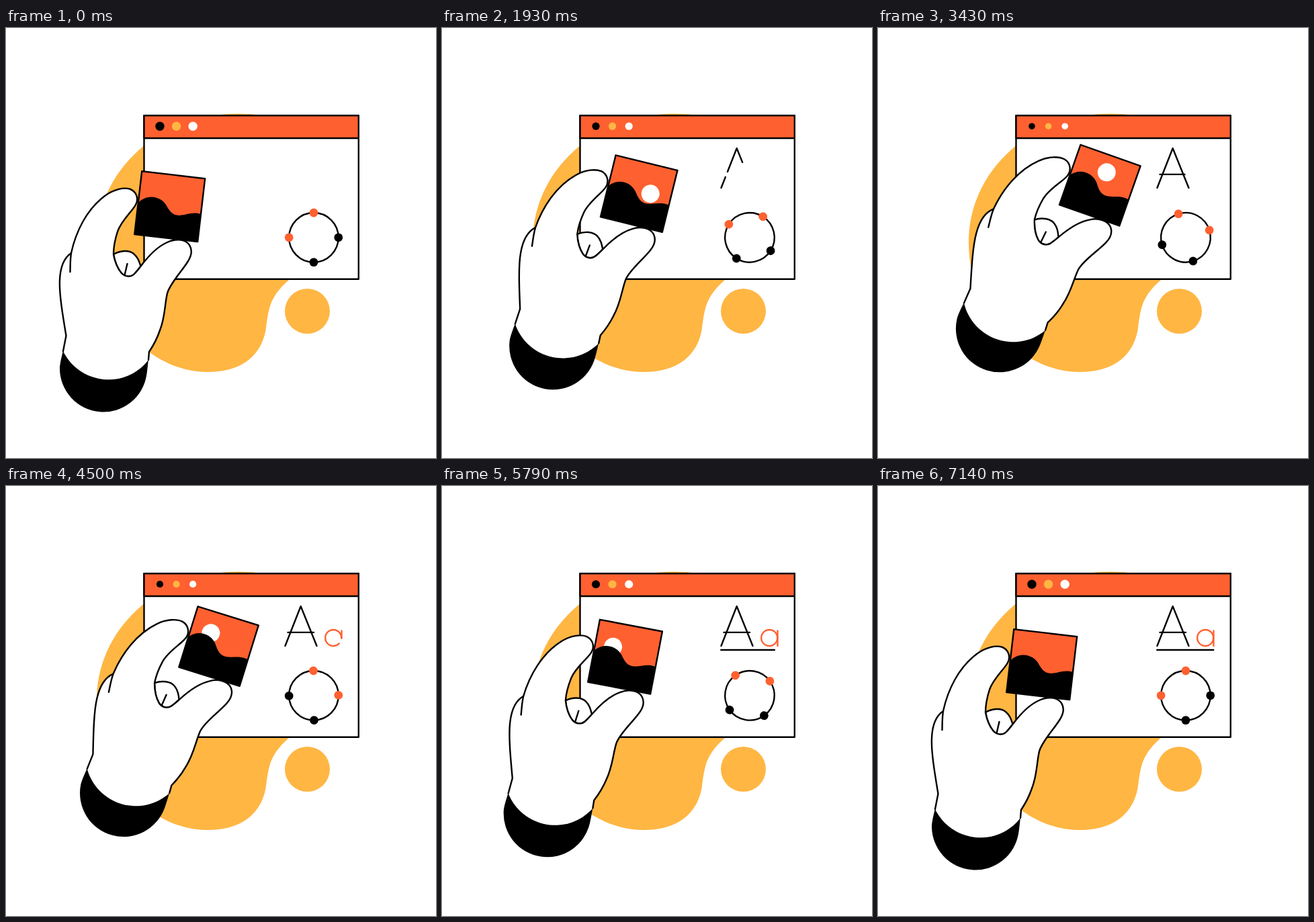
Recreate the animation shown at these times as an HTML page. Size 640 by 640 pixels, loop 7210 ms.

```html
<!DOCTYPE html>
<html lang="en">
<head>
<meta charset="utf-8">
<title>Placing a picture</title>
<style>
  html, body { margin: 0; width: 100%; height: 100%; overflow: hidden; background: #fff; }
  svg { display: block; width: 100%; height: 100%; }
  .line { fill: none; stroke: #000; stroke-width: 2.4; stroke-linecap: round; stroke-linejoin: round; }
  .white { fill: #fff; }
  .red { fill: #ff6030; }
  .yellow { fill: #ffb643; }
  .accent { stroke: #ff6030; }
</style>
</head>
<body>
<svg viewBox="0 0 640 640">
  <!-- backdrop -->
  <path class="yellow" d="M347 127.5C225 127 135 215 135 318C135 430 215 512 300 512
    C348 512 379 490 386.5 450C391 421 390 402 421 375V140Q385 127.5 347 127.5Z"/>
  <circle class="yellow" cx="448.5" cy="421.5" r="33.5"/>

  <!-- window -->
  <rect class="line white" x="205.5" y="130.3" width="319.3" height="243.5"/>
  <rect class="line red" x="205.5" y="130.3" width="319.3" height="33.7"/>
  <circle class="button" cx="229" cy="146.2"/>
  <circle class="button yellow" cx="253.6" cy="146.2"/>
  <circle class="button white" cx="278.2" cy="146.2"/>

  <!-- lettering -->
  <path id="foot" class="line" pathLength="1" d="M415.5 238L438.7 179L462.5 238"/>
  <path id="legs" class="line" pathLength="1" d="M415.5 238L438.7 179L462.5 238"/>
  <path id="bar" class="line" pathLength="1" d="M419.6 217.9H458"/>
  <path id="bowl" class="line accent" pathLength="1" d="M499.2 226a12 12 0 1 0-24 0a12 12 0 1 0 24 0"/>
  <path id="stem" class="line accent" pathLength="1" d="M499.5 215.5V238"/>
  <path id="underline" class="line" pathLength="1" d="M415.3 244H499.3"/>

  <!-- ring -->
  <g id="ring">
    <circle class="line" cx="458" cy="311.8" r="36.8"/>
    <circle class="red" cx="458" cy="275" r="6.4"/>
    <circle class="red" cx="421.2" cy="311.8" r="6.4"/>
    <circle cx="494.8" cy="311.8" r="6.4"/>
    <circle cx="458" cy="348.6" r="6.4"/>
  </g>

  <g id="hand">
    <!-- picture card -->
    <g transform="translate(243.75 265.6) rotate(6.67)">
      <rect class="red" x="-47.3" y="-47.3" width="94.6" height="94.6"/>
      <circle id="sun" class="white" r="13.5"/>
      <path d="M-47.3 0C-36-15-16-14-6-2C0 6 5 13 16 11.5C26 10 34 3.5 47.3 6V47.3H-47.3Z"/>
      <rect class="line" x="-47.3" y="-47.3" width="94.6" height="94.6"/>
    </g>
    <!-- cuff -->
    <path d="M89.5 458L84.5 482Q80 500 80 506A65 65 0 0 0 209.3 516Q211 505 213 482Z"/>
    <path class="white" d="M85 481A75 75 0 0 0 212 494L200 450H100Z"/>
    <!-- folded finger -->
    <path class="line white" d="M191 366C195 362 198 358 200.5 354.5C198 347 196 341 190 336C183 330 170 331 160 337
      C162 348 166 358 172 365C178 371 186 371 191 366Z"/>
    <!-- palm, index finger and thumb -->
    <path class="line white" d="M85 481L89.5 458C84 425 79 395 80 375C81 352 88 341 97 335
      C104 303 120 270 147 250C160 240 175 237 184 239.5C194 243 198 254 193 263
      C187 274 172 286 166 303C161.5 317 160 328 160 337C162 348 166 358 172 365C178 371 186 371 191 366
      C195 362 198 358 201 354C213 338 226 325 240 319C252 313 267 314 273 323C278 331 276 339 271 347
      C262 362 244 380 240 395C236 412 237 430 229 450C225 462 219 473 213 482L212 494"/>
    <path class="line" d="M97 335C95.5 345 95.8 350 95.5 363M180.5 351L176.5 368"/>
  </g>
</svg>
<script>
  const LOOP = 7210, FRAMES = 101;
  const $ = id => document.getElementById(id);
  const buttons = document.querySelectorAll('.button');

  // The sun's stops on the card: [share of the loop, x, y]
  const sunStops = [
    [0, 22, 30], [1 / 6, 20.6, 1.4], [1 / 2, 2.8, -21.8],
    [2 / 3, -19.9, -14.4], [5 / 6, -20.5, -11], [1, -22, 24]
  ];

  const ease = (u, from, to) => {
    const x = Math.min(1, Math.max(0, (u - from) / (to - from)));
    return x * x * (3 - 2 * x);
  };

  const swing = (u, peak) => ease(u, 0, peak) - ease(u, peak, 1);

  function sunAt(u) {
    let [, x, y] = sunStops[0];
    for (let i = 1; i < sunStops.length; i++) {
      const [t0, x0, y0] = sunStops[i - 1], [t1, x1, y1] = sunStops[i];
      const k = ease(u, t0, t1);
      x += (x1 - x0) * k;
      y += (y1 - y0) * k;
    }
    return [x, y];
  }

  function trim(id, from, to) {
    const style = $(id).style;
    style.visibility = to > from ? 'visible' : 'hidden';
    style.strokeDasharray = `${to - from} 2`;
    style.strokeDashoffset = -from;
  }

  function draw(u) {
    const move = swing(u, 1 / 2);
    $('hand').setAttribute('transform',
      `translate(${36.3 * move} ${-59.4 * move}) rotate(${12.8 * move} 145 505.5)`);
    $('ring').setAttribute('transform', `rotate(${90 * swing(u, 2 / 3)} 458 311.8)`);
    $('sun').setAttribute('transform', `translate(${sunAt(u)})`);
    buttons.forEach(b => b.setAttribute('r', 6.7 - 1.95 * move));

    const legs = ease(u, 1 / 6, 1 / 3), bowl = ease(u, 1 / 2, 2 / 3);
    trim('foot', 0, 0.203 * legs);
    trim('legs', 0.203, legs);
    trim('bar', 0, ease(u, 1 / 3, 1 / 2));
    trim('bowl', 0, bowl);
    trim('stem', 0, Math.max(0, bowl * 4 - 3));
    trim('underline', 0, ease(u, 2 / 3, 5 / 6));
  }

  // Steps at 14 pictures a second; the last one closes the swing.
  const start = performance.now();
  function tick() {
    const t = (performance.now() - start) % LOOP;
    const frame = Math.min(FRAMES - 1, Math.floor(t / LOOP * FRAMES + 0.1));
    draw(frame / (FRAMES - 1));
    requestAnimationFrame(tick);
  }
  tick();
</script>
</body>
</html>
```
